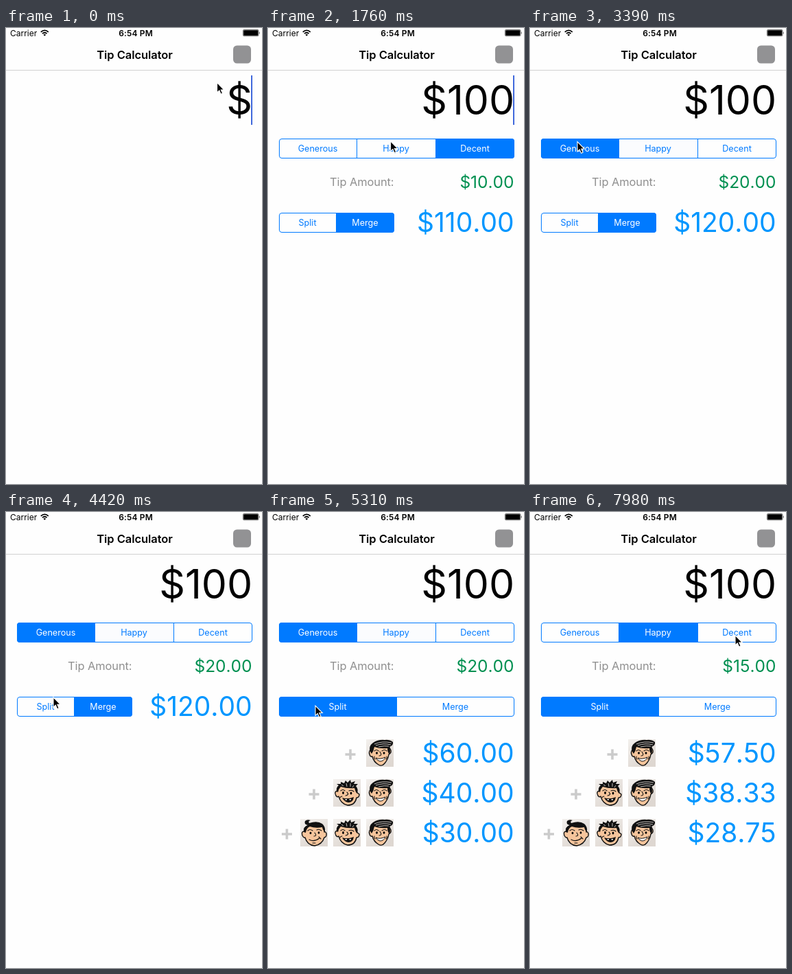
These frames come from a looping animation (373x664 px, 8 s). An HTML page:

```html
<!DOCTYPE html>
<html lang="en">
<head>
<meta charset="utf-8">
<title>Tip Calculator</title>
<style>
html, body { margin: 0; width: 100%; height: 100%; overflow: hidden; background: #fefefe; }
svg { display: block; width: 100%; height: 100%; font-family: Inter, "Liberation Sans", sans-serif; }
.end { text-anchor: end; }
.mid { text-anchor: middle; }
.sum { font-kerning: none; }
.share { fill: #0096ff; font-size: 38.9px; }
.seg { font-size: 12.6px; }
.ink { fill: none; stroke: #111; stroke-width: 1.1; stroke-linecap: round; stroke-linejoin: round; }
.skin { fill: #f6c59c; stroke: #111; stroke-width: 1.4; stroke-linejoin: round; }
.teeth { fill: #fff; stroke: #111; stroke-width: 1; stroke-linejoin: round; }
.shine { fill: none; stroke: #ece8e4; stroke-width: .8; }
</style>
</head>
<body>
<svg viewBox="0 0 373 664">
  <defs>
    <linearGradient id="paper" x1="0" y1="0" x2=".6" y2="1">
      <stop stop-color="#f3f0ed"/><stop offset="1" stop-color="#ded7d1"/>
    </linearGradient>
    <g id="curl">
      <rect width="40" height="40" fill="url(#paper)"/>
      <path class="skin" d="M6 18Q1 18 3 24Q5 28 7 27Q10 38 21 39Q32 37 35 27Q39 26 38 21Q37 18 35 19Q36 10 29 9L11 10Q6 12 6 18Z"/>
      <path d="M5 19Q4 11 11 9Q5 8 7 3Q10 0 15 2Q11 3 13 6Q25 2 32 7Q37 11 36 19Q33 17 32 12Q22 14 14 11Q9 13 8 20Z" fill="#111"/>
      <path class="ink" d="M11 17Q14 14 18 17M24 16Q27 14 31 17M21 20Q25 25 20 25M13 30Q20 34 28 28M27 26L30 29M18 35H22"/>
      <ellipse cx="15" cy="20.5" rx="1.4" ry="1.8"/><ellipse cx="27" cy="20" rx="1.4" ry="1.8"/>
    </g>
    <g id="spike">
      <rect width="40" height="40" fill="url(#paper)"/>
      <path class="skin" d="M6 17Q1 18 4 24Q6 27 8 25Q11 36 21 38Q32 38 34 27Q38 27 38 22L34 19Q34 10 25 9L12 9Q6 11 6 17Z"/>
      <path d="M5 18Q4 12 8 9L5 7L11 7L11 4L16 6L18 2L21 5L25 1L26 5L32 3L30 7L36 7L33 10Q37 14 35 21Q32 18 31 13Q20 14 11 11Q8 14 7 19Z" fill="#111"/>
      <path class="shine" d="M12 8L15 10M19 6L20 11M25 6L25 11M30 9L28 12"/>
      <path class="ink" d="M11 17Q14 14 17 17M23 17Q27 15 30 18M20 19Q24 23 18 24M10 27Q11 25 13 25"/>
      <ellipse cx="14.5" cy="20" rx="1.4" ry="1.9"/><ellipse cx="26" cy="20.5" rx="1.4" ry="1.9"/>
      <path d="M13 27Q21 30 30 26Q29 34 22 34Q16 33 13 27Z" fill="#111"/>
      <path class="teeth" d="M17 28.5H20.5V31H17ZM23 28.5H26.5V31H23Z"/>
    </g>
    <g id="quiff">
      <rect width="40" height="40" fill="url(#paper)"/>
      <path class="skin" d="M8 14Q3 17 5 22Q6 26 9 25Q11 33 18 37Q23 40 27 35Q32 29 33 22Q37 20 36 16L33 10L13 9Z"/>
      <path d="M6 18Q3 10 10 5Q18 0 27 1Q34 0 39 4Q40 9 34 11Q36 17 34 22Q31 19 31 13Q20 14 12 11Q11 17 8 21Z" fill="#111"/>
      <path class="shine" d="M12 7Q23 2 37 5M14 9Q25 5 36 8M18 11Q27 9 33 10"/>
      <path class="ink" d="M12 17Q15 14 18 17M23 17Q27 14 30 17M20 18Q24 24 19 24M12 25Q11 27 13 29M30 25Q31 27 29 29"/>
      <ellipse cx="15.5" cy="20" rx="1.5" ry="1.7"/><ellipse cx="26" cy="20" rx="1.5" ry="1.7"/>
      <path class="teeth" d="M14 27Q20 30 28 26Q26 32 20 32Q16 31 14 27Z"/>
    </g>
  </defs>
  <rect width="373" height="664" fill="#fefefe"/>

  <text x="6" y="11.5" font-size="12">Carrier</text>
  <g fill="none" stroke="#000" stroke-width="1.8">
    <path d="M50.8 5.8Q56.3 .9 61.8 5.8M53 8.2Q56.3 5.2 59.6 8.2"/>
    <path d="M56.3 11.8L54.4 9.8Q56.3 8.3 58.2 9.8Z" fill="#000" stroke="none"/>
  </g>
  <text class="mid" x="189" y="11.5" font-size="12" font-weight="600" letter-spacing=".15">6:54 PM</text>
  <rect x="345.4" y="2.4" width="22.6" height="9.4" rx="1.8" fill="none" stroke="#000" stroke-width=".6"/>
  <rect x="346.2" y="3.2" width="21" height="7.8" rx="1"/>
  <path d="M368.8 5.2Q370.4 7.1 368.8 9Z"/>
  <text class="mid" x="187.5" y="45" font-size="16.5" font-weight="600" letter-spacing="-.06">Tip Calculator</text>
  <rect x="331" y="25.5" width="26" height="26" rx="5.5" fill="#929294"/>
  <rect y="61" width="373" height="1" fill="#d2d2d2"/>

  <text id="bill" class="end sum" x="359" y="125.5" font-size="58.8"></text>
  <rect id="caret" x="357" y="69" width="2" height="72" fill="#4069dc"/>
  <g id="panel">
    <g id="mood"></g>
    <text class="end" x="183.5" y="230" font-size="16.4" letter-spacing="-.06" fill="#8f8f8f">Tip Amount:</text>
    <g id="mode"></g>
  </g>
  <text id="tip" class="end sum" x="358.5" y="233" font-size="24.5" fill="#009051"></text>
  <text id="total" class="end sum share" x="358.5" y="297"></text>
  <g id="rows"></g>
  <path id="mouse" d="M0 0V14.5L3.3 11.4L5.6 16.8L8.1 15.8L5.8 10.5H10.3Z" stroke="#fff" stroke-width="1.1"/>
</svg>
<script>
const LOOP = 8000, STEP = 147.6;
const $ = id => document.getElementById(id);
const clamp = v => Math.max(0, Math.min(1, v));
const money = v => "$" + v.toFixed(2);
const NS = "http://www.w3.org/2000/svg";

function add(parent, tag, attrs, text = "") {
  const el = document.createElementNS(NS, tag);
  for (const name in attrs) el.setAttribute(name, attrs[name]);
  el.textContent = text;
  parent.append(el);
  return el;
}

// Segmented control: edges are the x positions of borders and dividers.
function makeSegments(group, y, labels) {
  const clip = add(add(group, "clipPath", { id: group.id + "Clip" }), "rect", { x: 16, y, height: 29, rx: 4 });
  const body = add(group, "g", { "clip-path": `url(#${group.id}Clip)` });
  const fills = labels.map(() => add(body, "rect", { y, height: 29, fill: "#007aff" }));
  const lines = labels.slice(1).map(() => add(body, "rect", { y, width: 1, height: 29, fill: "#007aff" }));
  const frame = add(group, "rect", { x: 16.5, y: y + .5, height: 28, rx: 3.5, fill: "none", stroke: "#007aff" });
  const texts = labels.map(s => add(group, "text", { class: "seg mid", y: y + 19 }, s));
  return (edges, alphas) => {
    const width = edges[edges.length - 1] - edges[0];
    clip.setAttribute("width", width);
    frame.setAttribute("width", width - 1);
    fills.forEach((el, i) => {
      el.setAttribute("x", edges[i]);
      el.setAttribute("width", edges[i + 1] - edges[i]);
      el.setAttribute("fill-opacity", alphas[i]);
      texts[i].setAttribute("x", (edges[i] + edges[i + 1]) / 2);
      texts[i].setAttribute("fill", alphas[i] === 1 ? "#fff" : "#007aff");
    });
    lines.forEach((el, i) => el.setAttribute("x", edges[i + 1]));
  };
}

const drawMood = makeSegments($("mood"), 161, ["Generous", "Happy", "Decent"]);
const drawMode = makeSegments($("mode"), 269, ["Split", "Merge"]);

const plusX = [120, 67, 27.5], faces = ["quiff", "spike", "curl"];
const shares = plusX.map((x, row) => {
  const top = 331 + row * 58;
  add($("rows"), "path", { d: `M${x - 7.5} ${top + 22}h15m-7.5 -7.5v15`, stroke: "#cbcbcb", "stroke-width": 3.6 });
  for (let i = 0; i <= row; i++) add($("rows"), "use", { href: "#" + faces[i], x: 143 - i * 48, y: top });
  return add($("rows"), "text", { class: "end sum share", x: 358.5, y: top + 34 });
});

// Pointer stops: step, x, y
const stops = [
  [6, 307.5, 79.5], [13, 171, 170], [18, 170.5, 169.5], [21, 69, 165.5], [26, 69, 165.5],
  [31, 69, 282], [39, 69, 282], [44, 163.5, 177.5], [49, 163.5, 177.5], [52, 300, 179], [53, 300, 179], [54, 299, 179.5]
];

function pointer(k) {
  const i = stops.findIndex(s => s[0] >= k);
  if (i === 0) return stops[0].slice(1);
  if (i < 0) return stops[stops.length - 1].slice(1);
  const a = stops[i - 1], b = stops[i];
  const u = (k - a[0]) / (b[0] - a[0]), e = u * u * (3 - 2 * u);
  return [a[1] + (b[1] - a[1]) * e, a[2] + (b[2] - a[2]) * e];
}

// Selected mood: 0 generous, 1 happy, 2 decent
const moodAt = k => k < 15 ? 2 : k < 22 ? 1 : k < 47 ? 0 : 1;

function render(time) {
  // The screen refreshes in coarse steps.
  const k = Math.floor((time + 20) / STEP);

  $("bill").textContent = "$100".slice(0, 1 + Math.min(k, 3));
  $("caret").style.opacity = k < 7 || (k > 10 && k < 15) ? 1 : 0;
  $("panel").style.opacity = k < 1 ? 0 : clamp(.1 + (k - 1) * .3);

  const mood = moodAt(k), alphas = [0, 0, 0];
  if (k === 14 || k === 46) alphas[1] = .2;
  else if (k === 21) alphas[0] = .2;
  else if (mood === 0) alphas[1] = .01;
  alphas[mood] = 1;
  drawMood([16, 129, 244, 359], alphas);

  const split = k >= 33;
  drawMode(k < 36 ? [16, 99, 184] : [16, 187, 359],
    split ? [1, k < 36 ? .06 : 0] : [k === 32 ? .2 : 0, 1]);

  const rate = [.2, .15, .1][moodAt(k - 1)], sum = 100 * (1 + rate);
  const shown = clamp((k - 6) * .3), parted = split ? clamp(.17 + (k - 33) * .295) : 0;
  $("tip").textContent = money(100 * rate);
  $("tip").style.opacity = shown;
  $("total").textContent = money(sum);
  $("total").style.opacity = shown * (1 - parted);
  $("rows").style.opacity = parted;
  shares.forEach((el, i) => el.textContent = money(sum / (i + 2)));

  $("mouse").setAttribute("transform", `translate(${pointer(k)})`);
}

const start = performance.now();
function tick() {
  render((performance.now() - start) % LOOP);
  requestAnimationFrame(tick);
}
tick();
</script>
</body>
</html>
```
